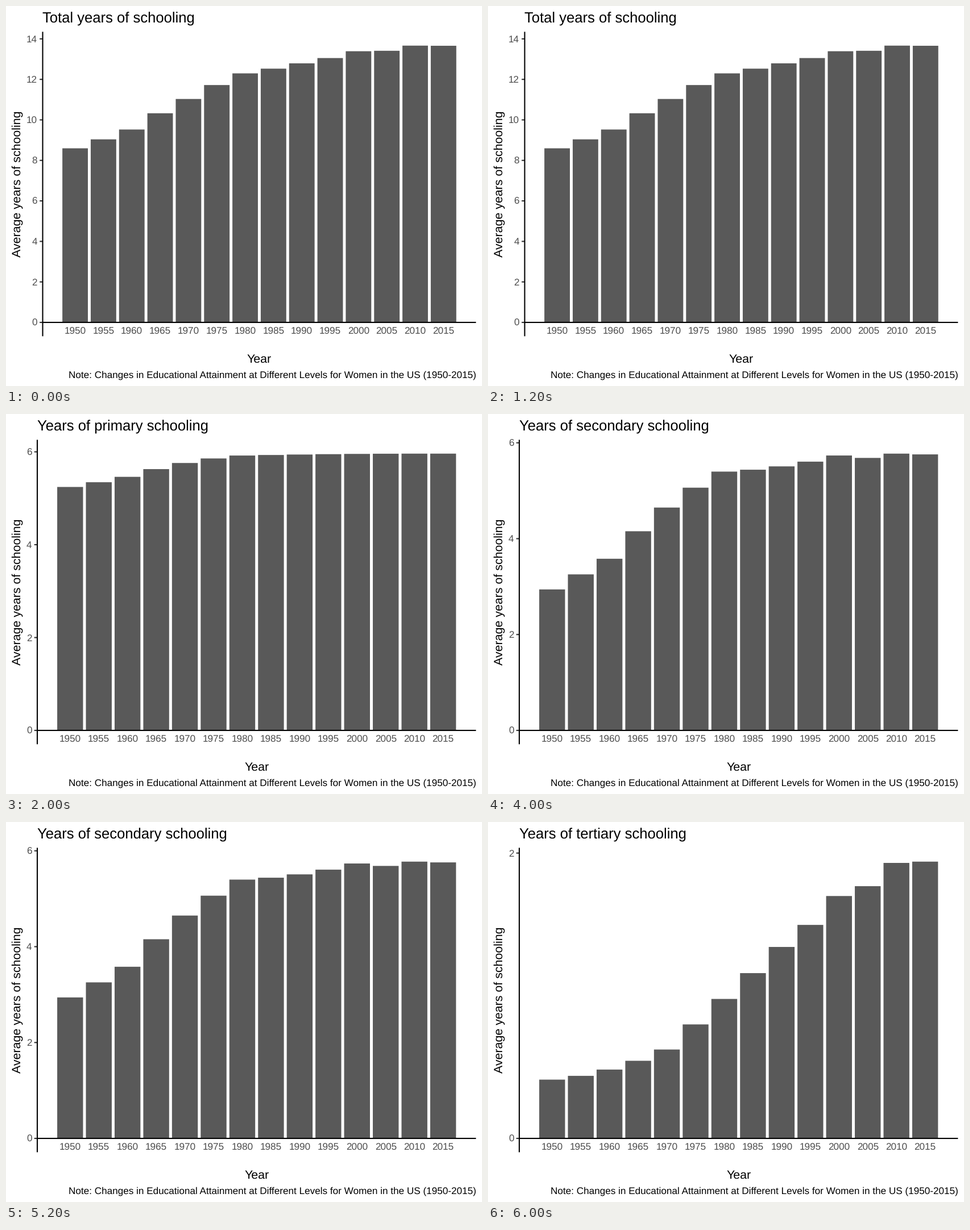
These frames come from a looping animation (837x669 px, 8 s). A matplotlib script:

```python
import matplotlib.pyplot as plt
import numpy as np
from matplotlib.animation import FuncAnimation
from matplotlib.patches import Rectangle

plt.rcParams["font.family"] = "Liberation Sans"
plt.rcParams["text.hinting"] = "none"

WIDTH, HEIGHT, DPI = 837, 669, 64
PT = 72 / DPI  # points per pixel
TOP, BOTTOM, RIGHT = 45.4, 581.4, 826.4
ZERO_Y = BOTTOM - (BOTTOM - TOP) / 22
FULL_BAR = (BOTTOM - TOP) / 1.1
BASE_SIZE, LINE = 21.36, 2.08
BAR, LABEL, TICK = "#595959", "#4d4d4d", "#333333"
NOTE = ("Note: Changes in Educational Attainment at Different Levels "
        "for Women in the US (1950-2015)")
YEARS = np.arange(1950, 2016, 5)


def trend(start, *arcs):
    """Chain of parabolic arcs, each given as (end year, end value, bulge)."""
    values = np.full(len(YEARS), float(start))
    year0, value0 = YEARS[0], start
    for year1, value1, bulge in arcs:
        u = (YEARS - year0) / (year1 - year0)
        arc = value0 + (value1 - value0) * u + 4 * bulge * u * (1 - u)
        values = np.where(YEARS > year0, arc, values)
        year0, value0 = year1, value1
    return values


primary = trend(5.243, (1960, 5.461, -0.007), (1980, 5.920, 0.069),
                (2015, 5.961, 0.012))
secondary = trend(2.941, (1960, 3.581, -0.006), (1980, 5.399, 0.159),
                  (2000, 5.735, -0.059), (2010, 5.774, -0.070), (2015, 5.758, 0))
tertiary = trend(0.412, (1970, 0.623, -0.035), (1990, 1.342, -0.005),
                 (2000, 1.699, -0.024), (2010, 1.931, -0.047), (2015, 1.940, 0))

# title, values, left edge of the panel
CHARTS = [
    ("Total years of schooling", primary + secondary + tertiary, 64.5),
    ("Years of primary schooling", primary, 55),
    ("Years of secondary schooling", secondary, 55),
    ("Years of tertiary schooling", tertiary, 55),
]

fig = plt.figure(figsize=(WIDTH / DPI, HEIGHT / DPI), dpi=DPI, facecolor="white")
ax = fig.add_axes([0, 0, 1, 1])


def write(x, y, text, scale=1.0, color="black", ha="center", **kwargs):
    ax.text(x, y, text, fontsize=BASE_SIZE * scale * PT, color=color,
            ha=ha, va="baseline", **kwargs)


def line(x0, y0, x1, y1, color="black"):
    ax.plot([x0, x1], [y0, y1], color=color, lw=LINE * PT,
            solid_capstyle="butt", snap=False)


def draw(index):
    title, values, left = CHARTS[index]
    ax.clear()
    ax.set(xlim=(0, WIDTH), ylim=(HEIGHT, 0))
    ax.axis("off")

    # Bars are 4.5 years wide; the panel adds 5 % on each side.
    per_year = (RIGHT - left) / (69.5 * 1.1)
    per_unit = FULL_BAR / values.max()
    first_x = left + (69.5 * 0.05 + 2.25) * per_year
    for year, value in zip(YEARS, values):
        x = first_x + (year - YEARS[0]) * per_year
        ax.add_patch(Rectangle((x - 2.25 * per_year, ZERO_Y), 4.5 * per_year,
                               -value * per_unit, fc=BAR, lw=0, snap=False))
        write(x, 578, str(year), 0.8, LABEL)

    for tick in np.arange(0, values.max() * 1.05, 2):
        y = ZERO_Y - tick * per_unit
        line(left - 5.3, y, left, y, TICK)
        write(left - 9.5, y + 6, f"{tick:.0f}", 0.8, LABEL, ha="right")

    line(left, ZERO_Y, RIGHT, ZERO_Y)
    line(left, TOP, left, BOTTOM)

    write(left, 29.7, title, 1.2, ha="left")
    write((left + RIGHT) / 2, 627.3, "Year")
    write(26.1, (TOP + BOTTOM) / 2, "Average years of schooling",
          rotation=90, rotation_mode="anchor")
    write(RIGHT, 654.7, NOTE, 0.8, ha="right")
    return []


animation = FuncAnimation(fig, draw, frames=len(CHARTS), interval=2000, repeat=True)
plt.show()
```
